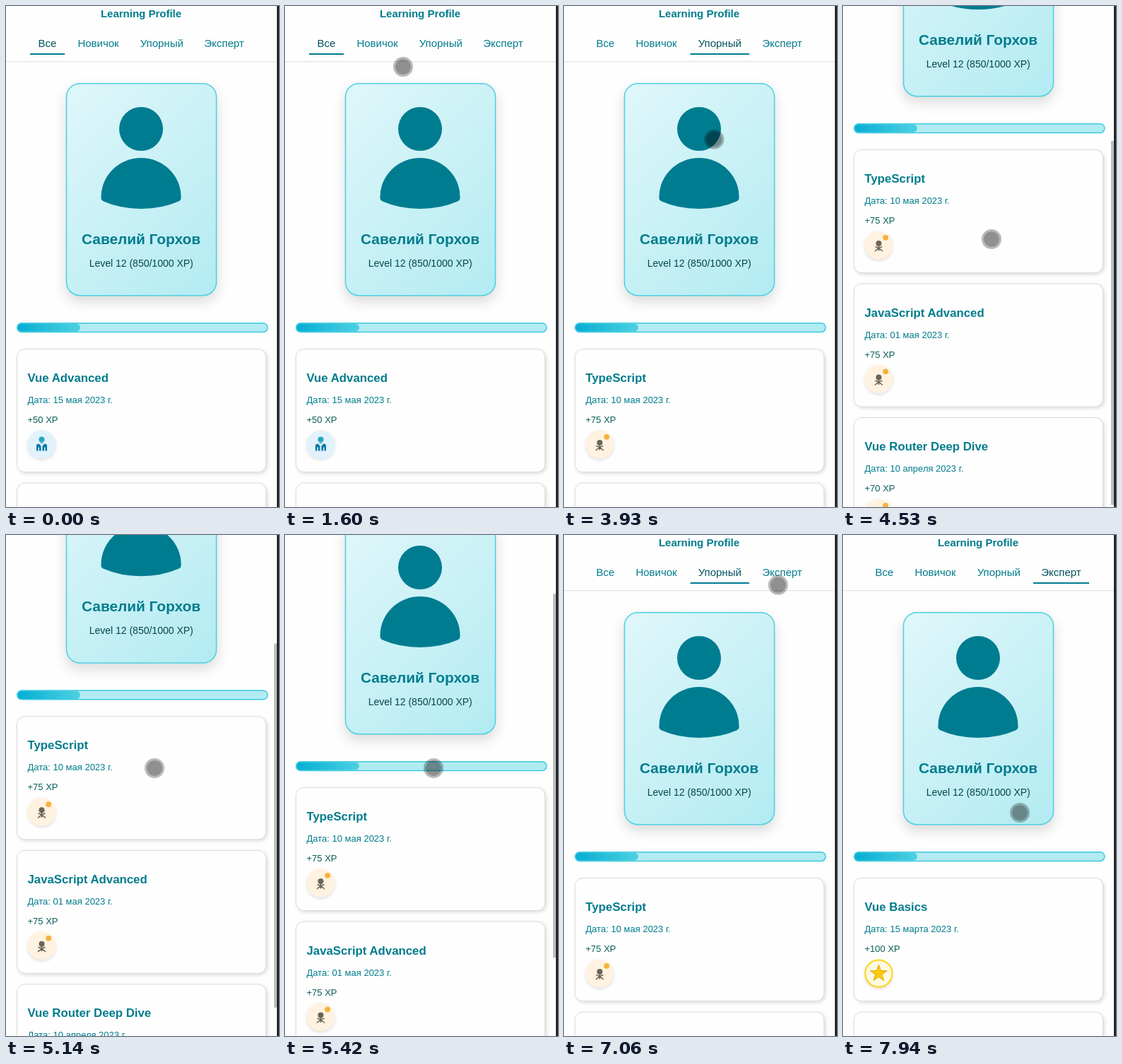
An HTML page for the animation above (8 s loop, 386 px wide and 709 px high).

```html
<!DOCTYPE html>
<html lang="ru">
<head>
<meta charset="utf-8">
<title>Learning Profile</title>
<style>
  html, body { margin: 0; width: 100%; height: 100%; overflow: hidden; background: #fefefe; }
  svg { display: block; width: 386px; height: 709px; font-family: "Liberation Sans", Arial, sans-serif; }
  text { fill: #007c8c; font-size: 13px; }
  .mid { text-anchor: middle; }
  .brand { font-size: 15px; font-weight: bold; }
  .tab { font-size: 15px; }
  .name { font-size: 20.8px; font-weight: bold; }
  .level { font-size: 14px; fill: #07474d; }
  .title { font-size: 16.8px; font-weight: bold; }
  .xp { fill: #0b5f5a; }
  .profile { filter: drop-shadow(0 8px 9px rgba(0, 0, 0, .14)); }
  .panel { fill: #fefefe; stroke: #dadada; filter: drop-shadow(2px 2px 2.5px rgba(0, 0, 0, .13)); }
  .badge { filter: drop-shadow(0 2px 2px rgba(0, 0, 0, .12)); }
</style>
</head>
<body>
<svg viewBox="0 0 386 709">
  <defs>
    <linearGradient id="sky" gradientUnits="userSpaceOnUse" x1="63" y1="132" x2="319" y2="388">
      <stop stop-color="#e0f7fa"/><stop offset="1" stop-color="#b2ebf2"/>
    </linearGradient>
    <linearGradient id="fill">
      <stop stop-color="#06aed4"/><stop offset="1" stop-color="#4dd0e1"/>
    </linearGradient>
  </defs>
  <rect width="386" height="709" fill="#fefefe"/>
  <g id="page">
    <path d="M0 78.5H383" stroke="#e6e6e6"/>
    <path d="M0 79.5H383" stroke="#f6f6f6"/>
    <text class="brand mid" x="191" y="16">Learning Profile</text>
    <g id="tabs"></g>
    <rect class="profile" x="85.5" y="109.7" width="212" height="300" rx="19" fill="url(#sky)" stroke="#4dd0e1" stroke-width="1.5"/>
    <g fill="#007c91">
      <circle cx="191" cy="174" r="31"/>
      <path d="M134.5 270A56.5 55 0 0 1 247.5 270Q248 275 244 276.5Q220 287 191 287T138 276.5Q134 275 134.5 270Z"/>
    </g>
    <text class="name mid" x="191" y="337">Савелий Горхов</text>
    <text class="level mid" x="191.2" y="369">Level 12 (850/1000 XP)</text>
    <rect x="15.7" y="448.7" width="354.2" height="12.8" rx="6.4" fill="#b2ebf2" stroke="#3ccade" stroke-width="1.5"/>
    <rect x="16.5" y="449.5" width="88.5" height="11.2" rx="5.6" fill="url(#fill)"/>
    <g id="novice"></g>
    <g id="steady"></g>
    <g id="expert"></g>
  </g>
  <rect id="thumb" x="379" width="4" height="515" fill="#bcbcbc"/>
  <rect x="383" width="3" height="709" fill="#242424"/>
  <g id="cursor">
    <circle r="12.5" fill="none" stroke="#000" stroke-opacity=".27" stroke-width="3"/>
    <circle r="11" fill-opacity=".43"/>
  </g>
</svg>
<script>
const LOOP = 8000;
const $ = id => document.getElementById(id);

const icons = {
  novice: `<circle class="badge" r="20" fill="#e1f2fd"/>
    <circle cy="-7" r="4" fill="#26a5c4"/><path d="M-2.5 -4H2.5L1.5 -1H-1.5Z" fill="#7fb9c9"/>
    <path d="M-7.5 9V2Q-7.5 -1 -4 -1L-1 2V9H-3.5V4H-5V9Z M7.5 9V2Q7.5 -1 4 -1L1 2V9H3.5V4H5V9Z" fill="#0878a6"/>`,
  steady: `<circle class="badge" r="20" fill="#fff2e0"/>
    <circle cx="9.7" cy="-10.7" r="3.9" fill="#f6b23a"/>
    <circle cy="-2.5" r="4" fill="#6b6557"/>
    <path d="M0 0V8M-5.5 8.5L0 4L5.5 8.5M-5 2L0 4L5 2" fill="none" stroke="#6b6557" stroke-width="1.6"/>`,
  expert: `<circle class="badge" r="19" fill="#fff9e3" stroke="#ffd614" stroke-width="2"/>
    <path d="${star(12.5, 5)}" fill="#ffca0a" stroke="#d9a81c"/>`
};

function star(outer, inner) {
  const points = Array.from({ length: 10 }, (_, i) => {
    const r = i % 2 ? inner : outer, a = i * Math.PI / 5;
    return `${(r * Math.sin(a)).toFixed(2)} ${(-r * Math.cos(a)).toFixed(2)}`;
  });
  return `M${points.join('L')}Z`;
}

function card(row, kind, title, date, xp) {
  const body = title ? `<text class="title" x="30.5" y="47">${title}</text>
    <text x="30.5" y="77">Дата: ${date} 2023 г.</text>
    <text class="xp" x="30.5" y="105">+${xp} XP</text>
    <g transform="translate(50.5 135.5)">${icons[kind]}</g>` : '';
  return `<g transform="translate(0 ${485 + row * 189.5})">
    <rect class="panel" x="15.5" y=".5" width="352" height="174" rx="11"/>${body}</g>`;
}

$('novice').innerHTML = card(0, 'novice', 'Vue Advanced', '15 мая', 50) + card(1);
$('steady').innerHTML = card(0, 'steady', 'TypeScript', '10 мая', 75)
  + card(1, 'steady', 'JavaScript Advanced', '01 мая', 75)
  + card(2, 'steady', 'Vue Router Deep Dive', '10 апреля', 70);
$('expert').innerHTML = card(0, 'expert', 'Vue Basics', '15 марта', 100) + card(1);

// label, underline start and end, time selected
const tabs = [['Все', 34, 83, -500], ['Новичок', 90, 171, 2090], ['Упорный', 178.5, 262, 3250], ['Эксперт', 269, 348, 7260]];
$('tabs').innerHTML = tabs.map(([label, a, b]) =>
  `<text class="tab mid" x="${(a + b) / 2}" y="58">${label}</text>
   <rect x="${a}" y="67" width="${b - a}" height="2" fill="#007c91"/>`).join('');
const labels = [...$('tabs').querySelectorAll('text')];
const lines = [...$('tabs').querySelectorAll('rect')];
const spareCard = $('novice').lastElementChild;

const scrollPath = [[4390, 0], [4530, 282], [4600, 286], [5000, 286], [5210, 200], [5420, 128],
  [5700, 86], [5990, 86], [6120, 8], [6190, 0]];
const cursorPath = [[440, 299, 617], [580, 218, 427], [1110, 218, 427], [1390, 186, 220], [1600, 167, 86],
  [1950, 147, 60], [2850, 147, 60], [3120, 206, 64], [3300, 217, 54], [3700, 216, 58],
  [3950, 212, 200], [4200, 210, 330], [6380, 210, 330], [6750, 275, 150], [7130, 309, 53],
  [7330, 309, 53], [7600, 298, 140], [7940, 250, 393]];

const ramp = (t, from, to) => Math.min(1, Math.max(0, (t - from) / (to - from)));

function follow(path, t) {
  const next = path.findIndex(p => p[0] > t);
  if (next < 0) return path[path.length - 1].slice(1);
  if (next === 0) return path[0].slice(1);
  const a = path[next - 1], b = path[next], k = ramp(t, a[0], b[0]);
  return a.slice(1).map((v, i) => v + (b[i + 1] - v) * k);
}

function show(el, opacity, rise = 0) {
  el.setAttribute('opacity', opacity);
  el.setAttribute('visibility', opacity > 0 ? 'visible' : 'hidden');
  if (rise) el.setAttribute('transform', `translate(0 ${rise * (1 - opacity)})`);
}

function enter(el, t, start) {
  const k = 1 - (1 - ramp(t, start, start + 300)) ** 2;
  el.setAttribute('transform', `translate(0 ${20 * (1 - k)})`);
  return k;
}

function draw(t) {
  const [scroll] = follow(scrollPath, t);
  $('page').setAttribute('transform', `translate(0 ${-scroll})`);
  $('thumb').setAttribute('y', -6.4 + scroll * .7);
  show($('thumb'), t > 4400 ? 1 - ramp(t, 6170, 6200) : 0);

  tabs.forEach((tab, i) => {
    const end = i < 3 ? tabs[i + 1][3] : LOOP + 500;
    const on = ramp(t, tab[3], tab[3] + 200) * (1 - ramp(t, end, end + 200));
    show(lines[i], on);
    labels[i].style.fill = on > .5 ? '#00525e' : '#007c8c';
  });

  show($('novice'), 1 - ramp(t, 3250, 3550));
  show(spareCard, t < 2390 ? 1 - ramp(t, 2090, 2390) : ramp(t, 2390, 2690));
  show($('steady'), enter($('steady'), t, 3550) * (1 - ramp(t, 7260, 7560)));
  show($('expert'), enter($('expert'), t, 7560));

  const [x, y] = follow(cursorPath, t);
  $('cursor').setAttribute('transform', `translate(${x} ${y})`);
  show($('cursor'), t >= 440 ? 1 : 0);
}

let start;
function tick(now) {
  start ??= now;
  draw((now - start) % LOOP);
  requestAnimationFrame(tick);
}
draw(0);
requestAnimationFrame(tick);
</script>
</body>
</html>
```
